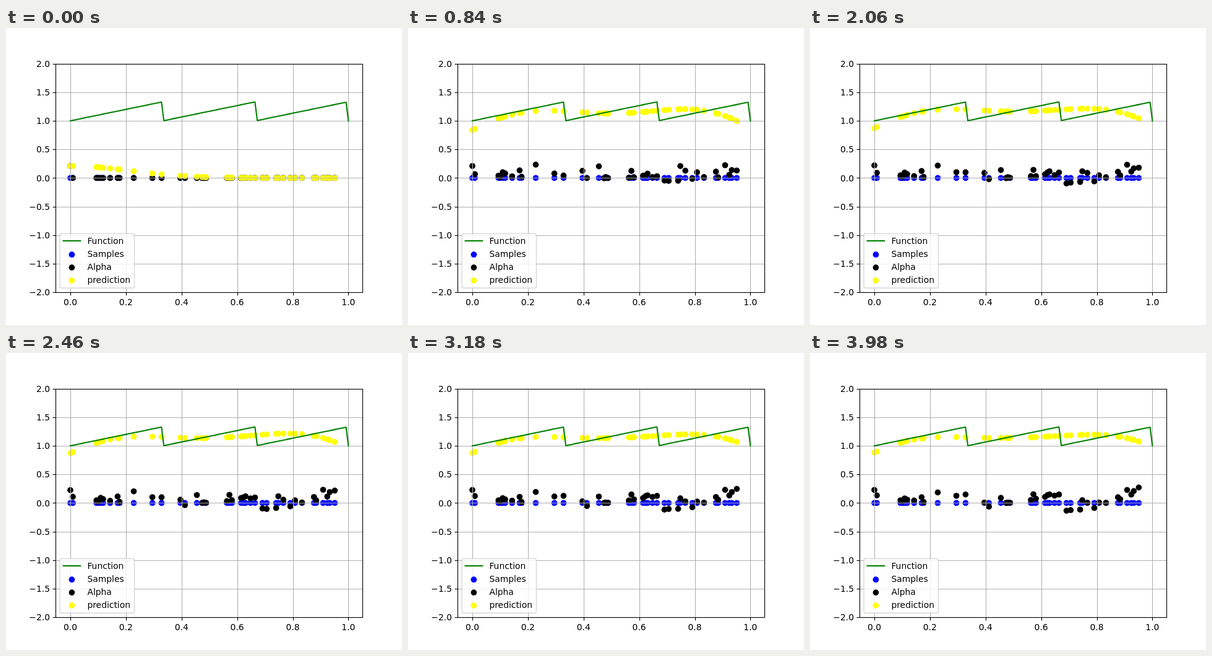
Write an HTML page that moves like this. It is 640 px wide and 480 px high and loops after 4000 ms.

```html
<!DOCTYPE html>
<html lang="en">
<head>
<meta charset="utf-8">
<title>Kernel regression</title>
<style>
  html, body { margin: 0; width: 100%; height: 100%; overflow: hidden; background: #fff; }
  svg { display: block; width: 640px; height: 480px; }
  text { font: 13.89px "DejaVu Sans", sans-serif; }
</style>
</head>
<body>
<svg id="plot" viewBox="0 0 640 480"></svg>
<script>
const FRAME_MS = 20, FRAMES = 200;
const RATE = .21, RIDGE = .5, SPREAD = .09, STRIDE = 17;
const RADIUS = 4.86, THIN = 1.11, THICK = 2.08;
const BLUE = "#00f", BLACK = "#000", YELLOW = "#ff0", GREEN = "#008000", GRID = "#b0b0b0";
const BOX = { left: 80.5, right: 576.5, top: 58.5, bottom: 427.5 };

// Sample positions in the order of the first training pass.
const xs = [
  0, .228, .455, .748, .909, .396, .17, .766, .572, .808,
  .876, .951, .109, .63, .118, .295, .933, .833, .009, .094,
  .623, .924, .143, .48, .412, .664, .177, .328, .581, .648,
  .884, .1, .563, .614, .74, .474, .488, .691, .791, .706
];

const svg = document.getElementById("plot");
const X = v => 104 + 449.4 * v;
const Y = v => 242.4 - 92.4 * v;
const snap = v => Math.floor(v + .5) + .5;
const sawtooth = x => 1 + (x < 1 ? x % (1 / 3) : 0);

function add(name, attrs, text) {
  const node = document.createElementNS("http://www.w3.org/2000/svg", name);
  for (const key in attrs) node.setAttribute(key, attrs[key]);
  if (text) node.textContent = text;
  return svg.appendChild(node);
}
const line = (x1, y1, x2, y2, stroke, width = THIN) =>
  add("line", { x1, y1, x2, y2, stroke, "stroke-width": width });
const dot = (cx, cy, fill) => add("circle", { cx, cy, r: RADIUS, fill });
const dots = color => xs.map(x => dot(X(x), Y(0), color));
const label = v => v.toFixed(1).replace("-", "\u2212");

// Kernel ridge regression, trained on one sample per frame.
const predict = (x, weights) =>
  xs.reduce((sum, center, i) => sum + weights[i] * Math.exp(-((x - center) ** 2) / SPREAD), 0);

function train() {
  const count = xs.length, weights = xs.map(() => 0), history = [];
  for (let step = 0; step < FRAMES; step++) {
    const i = step < count ? step : (count - 1 + STRIDE * (step - count)) % count;
    const error = sawtooth(xs[i]) - predict(xs[i], weights);
    weights[i] += RATE * (error - RIDGE * weights[i]);
    history.push({ weights: [...weights], heights: xs.map(x => predict(x, weights)) });
  }
  return history;
}

function drawAxes() {
  for (let i = 0; i <= 5; i++) {
    const x = snap(X(i / 5));
    line(x, BOX.top, x, BOX.bottom, GRID);
    line(x, BOX.bottom, x, BOX.bottom + 4.9, BLACK);
    add("text", { x: X(i / 5), y: 448, "text-anchor": "middle" }, label(i / 5));
  }
  for (let i = -4; i <= 4; i++) {
    const y = snap(Y(i / 2));
    line(BOX.left, y, BOX.right, y, GRID);
    line(BOX.left - 4.9, y, BOX.left, y, BLACK);
    add("text", { x: 71, y: Math.round(Y(i / 2) + 5.2), "text-anchor": "end" }, label(i / 2));
  }
}

function drawFunction() {
  const points = Array.from({ length: 120 }, (_, i) => `${X(i / 119)},${Y(sawtooth(i / 119))}`);
  add("polyline", {
    points: points.join(" "), fill: "none", stroke: GREEN, "stroke-width": THICK,
    "stroke-linecap": "square", "stroke-linejoin": "round"
  });
  add("rect", {
    x: BOX.left, y: BOX.top, width: BOX.right - BOX.left, height: BOX.bottom - BOX.top,
    fill: "none", stroke: BLACK, "stroke-width": THIN
  });
}

function drawLegend() {
  add("rect", {
    x: 87, y: 332.4, width: 120.5, height: 87.8, rx: 2.8, fill: "#fff", "fill-opacity": .8,
    stroke: "#ccc", "stroke-opacity": .8, "stroke-width": 1.39
  });
  line(91.5, 344, 121.3, 344, GREEN, THICK);
  ["Function", "Samples", "Alpha", "prediction"].forEach((name, i) => {
    if (i) dot(106.4, 345.3 + 20.9 * i, [BLUE, BLACK, YELLOW][i - 1]);
    add("text", { x: 131.4, y: 349 + 21 * i }, name);
  });
}

// The grid lies above the dots, the function above the grid.
dots(BLUE);
const weightDots = dots(BLACK);
const fitDots = dots(YELLOW);
drawAxes();
drawFunction();
drawLegend();

const history = train();

function draw(step) {
  const { weights, heights } = history[step];
  xs.forEach((_, i) => {
    weightDots[i].setAttribute("cy", Y(weights[i]));
    fitDots[i].setAttribute("cy", Y(heights[i]));
  });
}

const begin = performance.now();
function tick() {
  draw(Math.floor((performance.now() - begin) / FRAME_MS) % FRAMES);
  requestAnimationFrame(tick);
}
tick();
</script>
</body>
</html>
```
